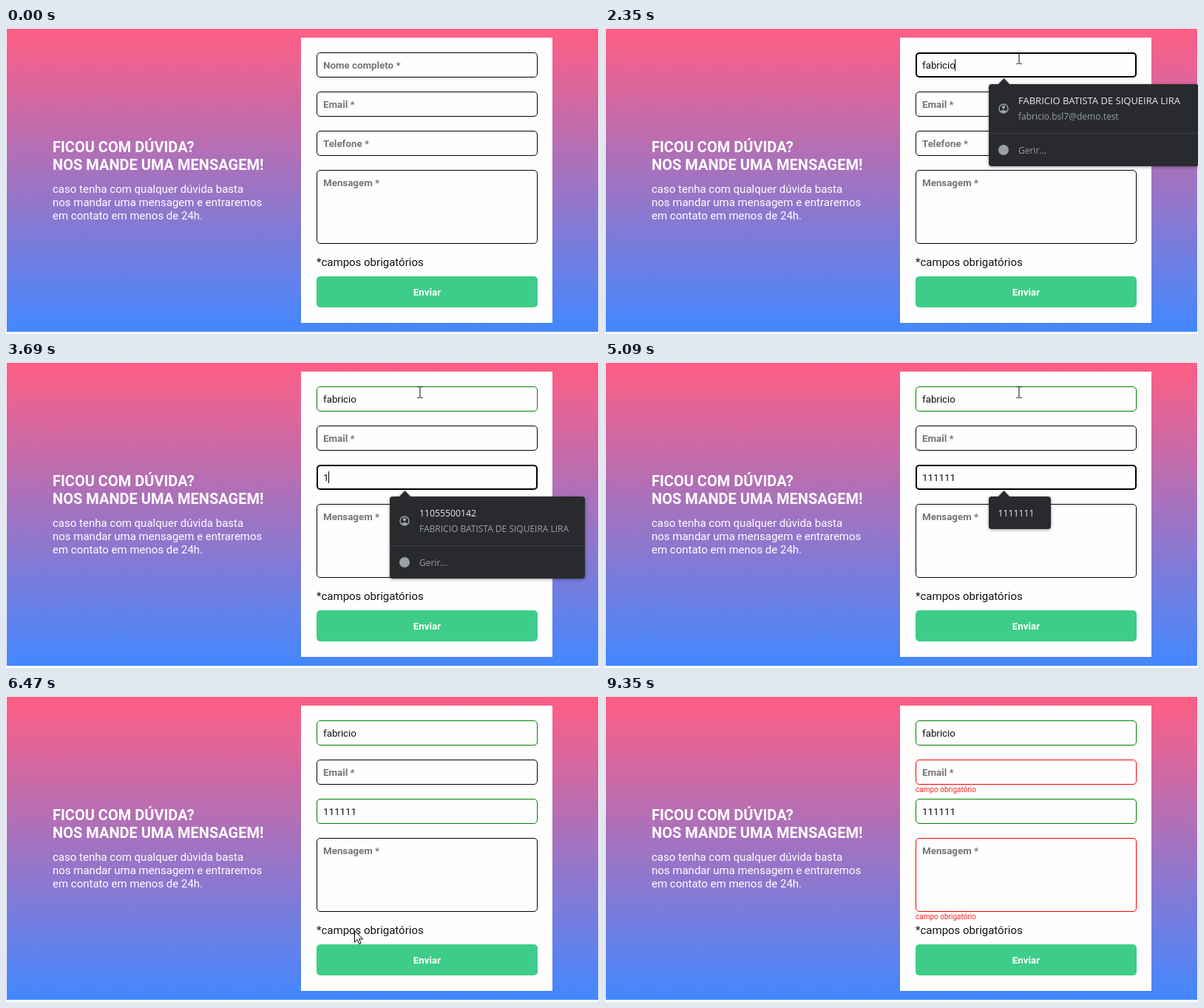
Recreate the animation shown at these times as an HTML page. Size 802 px wide and 414 px high, loop 9.55 s.

```html
<!DOCTYPE html>
<html lang="pt-BR">
<head>
<meta charset="utf-8">
<title>Formulário de contato</title>
<style>
  html, body { margin: 0; width: 100%; height: 100%; overflow: hidden; background: #fff; }
  svg { display: block; width: 802px; height: 414px; }
  text { font-family: Roboto, sans-serif; white-space: pre; }
  .title { font-weight: 700; font-size: 20px; fill: #fff; }
  .lead { font-size: 15px; fill: #fff; }
  .note { font-size: 15px; fill: #111; }
  .hint { font-weight: 700; font-size: 13.333px; fill: #757575; }
  .value { font-size: 13.333px; fill: #111; }
  .send { font-weight: 700; font-size: 13.333px; fill: #fff; text-anchor: middle; }
  .error { font-size: 10px; fill: #f22; }
  .popup { filter: drop-shadow(0 1px 2px rgba(0, 0, 0, .4)); }
  .popup text { font-family: "Open Sans", "Noto Sans", sans-serif; }
  .main { font-size: 13px; fill: #e8eaed; }
  .digits { font-size: 12.25px; fill: #e8eaed; }
  .sub { font-size: 12px; fill: #9aa0a6; }
  .pointer { fill: #fff; stroke: #000; stroke-linejoin: round; }
</style>
</head>
<body>
<svg id="stage" viewBox="0 0 802 414">
  <defs>
    <linearGradient id="sky" x1="0" y1="0" x2="0" y2="1">
      <stop offset="0" stop-color="#ff5e84"/>
      <stop offset="1" stop-color="#4288ff"/>
    </linearGradient>
  </defs>
  <rect x="1" y="1" width="800" height="410" fill="url(#sky)"/>
  <text class="title" x="63" y="168">FICOU COM DÚVIDA?</text>
  <text class="title" x="63" y="192">NOS MANDE UMA MENSAGEM!</text>
  <text class="lead" x="63" y="223">caso tenha com qualquer dúvida basta</text>
  <text class="lead" x="63" y="241">nos mandar uma mensagem e entraremos</text>
  <text class="lead" x="63" y="259">em contato em menos de 24h.</text>
  <rect x="399" y="13" width="340" height="386" fill="#fefefe"/>
  <g id="fields"></g>
  <rect id="caret" width="1" height="16" fill="#000"/>
  <g id="errors">
    <text class="error" x="420" y="130">campo obrigatório</text>
    <text class="error" x="420" y="302">campo obrigatório</text>
  </g>
  <text class="note" x="420" y="322">*campos obrigatórios</text>
  <rect x="420" y="336" width="299" height="42" rx="5" fill="#3dcd88"/>
  <text class="send" x="569.5" y="362">Enviar</text>
  <g id="popups"></g>
  <circle id="click" r="12" fill="#f8f020" opacity=".6"/>
  <g id="mouse">
    <path id="arrow" class="pointer" d="M.5 .5V16.2L4.2 12.7L6.7 18.4L9.1 17.4L6.6 11.8H11.6Z"/>
    <path id="beam" fill="none" stroke="#000" d="M-3.5 -7.5H-1L0 -6.5L1 -7.5H3.5M0 -6.5V6.5M-3.5 7.5H-1L0 6.5L1 7.5H3.5"/>
    <path id="hand" class="pointer" d="M-1.5 1.5Q0 -.8 1.5 1.5V8Q3.2 6.5 4.5 8.3Q6 7 7.3 9Q9.6 8.2 9.8 10.5V15Q9.5 18 8 19.5V21.5H-1.5V19.5L-5.5 13.5Q-6.5 11 -4 11.3L-1.5 13.5Z"/>
  </g>
</svg>
<script>
const LOOP = 9550, STEP = 70;
const $ = id => document.getElementById(id);

function add(parent, tag, attrs, text) {
  const el = document.createElementNS('http://www.w3.org/2000/svg', tag);
  for (const key in attrs) el.setAttribute(key, attrs[key]);
  if (text) el.textContent = text;
  parent.append(el);
  return el;
}
const show = (el, on) => { el.style.display = on ? '' : 'none'; };
const within = (t, from, to) => t >= from && t < to;

// Form fields
function makeField(y, height, label) {
  const g = $('fields');
  return {
    y, height,
    box: add(g, 'rect', { fill: 'none' }),
    hint: add(g, 'text', { class: 'hint', x: 429, y: y + 22 }, label),
    value: add(g, 'text', { class: 'value', x: 429, y: y + 22 })
  };
}
const fields = [
  makeField(33, 34, 'Nome completo *'),
  makeField(86, 34, 'Email *'),
  makeField(139, 34, 'Telefone *'),
  makeField(192, 100, 'Mensagem *')
];

function drawField(field, color, focused, value) {
  const line = focused ? 2 : 1;
  const attrs = {
    x: 420 + line / 2, y: field.y + line / 2,
    width: 299 - line, height: field.height - line,
    rx: 5 - line / 2, stroke: color, 'stroke-width': line
  };
  for (const key in attrs) field.box.setAttribute(key, attrs[key]);
  show(field.hint, !value);
  if (field.value.textContent !== value) field.value.textContent = value;
}

// Autofill popups
function makePopup(top, width, height) {
  const g = add($('popups'), 'g', { class: 'popup' });
  add(g, 'path', { d: `M531 ${top + 1}L539.5 ${top - 8}L548 ${top + 1}Z`, fill: '#292a2d' });
  add(g, 'rect', { x: 519, y: top, width, height, rx: 4, fill: '#292a2d' });
  g.style.transformOrigin = `${519 + width / 2}px ${top + height / 2}px`;
  return g;
}
function makeProfile(top, width, main, mainClass, sub) {
  const g = makePopup(top, width, 111);
  const gray = '#9aa0a6';
  add(g, 'circle', { cx: 539, cy: top + 33, r: 6, fill: 'none', stroke: gray, 'stroke-width': 1.5 });
  add(g, 'circle', { cx: 539, cy: top + 31, r: 2.2, fill: gray });
  add(g, 'path', { d: `M534.6 ${top + 37}Q539 ${top + 32.5} 543.4 ${top + 37}Q539 ${top + 41} 534.6 ${top + 37}Z`, fill: gray });
  add(g, 'text', { class: mainClass, x: 559, y: top + 27 }, main);
  add(g, 'text', { class: 'sub', x: 559, y: top + 48 }, sub);
  add(g, 'rect', { x: 519, y: top + 66, width, height: 1, fill: '#3f4246' });
  add(g, 'circle', { cx: 539, cy: top + 89, r: 7, fill: gray });
  add(g, 'text', { class: 'sub', x: 559, y: top + 94 }, 'Gerir...');
  return g;
}
const person = 'FABRICIO BATISTA DE SIQUEIRA LIRA';
const namePopup = makeProfile(76, 284, person, 'main', 'fabricio.bsl7@demo.test');
const phonePopup = makeProfile(182, 264, '11055500142', 'digits', person);
const shortPopup = makePopup(182, 84, 44);
add(shortPopup, 'text', { class: 'digits', x: 531.5, y: 209 }, '1111111');

function drawPopup(popup, t, from, fade, to) {
  show(popup, within(t, from, to));
  const gone = t < fade ? 0 : Math.floor((t - fade + 10) / STEP) * STEP / 320;
  popup.style.opacity = 1 - gone;
  popup.style.transform = `scale(${1 - gone * .053})`;
}

// Typing: one key per time
const nameKeys = [1480, 1610, 1880, 1970, 2070, 2160, 2250, 2350];
const phoneKeys = [3690, 3890, 4020, 4220, 4420, 4560];
const typed = (text, keys, t) => text.slice(0, keys.filter(k => k <= t).length);

// Pointer path: time, x, y
const path = [
  [200, 680, 2], [410, 645, 24], [620, 619, 46], [810, 619, 46], [950, 560, 41],
  [5290, 555, 52], [5430, 480, 125], [5640, 385, 215], [5780, 362, 236],
  [5980, 362, 236], [6190, 400, 265], [6470, 471, 317], [6750, 506, 348], [6890, 512, 353],
  [8090, 510, 349], [8370, 480, 270], [8720, 440, 120], [9000, 424, 42],
  [9070, 420, 34], [9350, 412, -24]
];
function pointerAt(t) {
  const i = path.findIndex(p => p[0] > t);
  if (i < 1) return path[i < 0 ? path.length - 1 : 0].slice(1);
  const [a, x, y] = path[i - 1], [b, u, v] = path[i];
  // Pointer rests through the long pauses
  if (b - a > 1000) return [x, y];
  const k = (t - a) / (b - a);
  return [x + (u - x) * k, y + (v - y) * k];
}
const legs = [200, 810, 5290, 5980, 8090];

function drawPointer(t) {
  const start = legs.filter(l => l <= t).pop() ?? 0;
  const [x, y] = pointerAt(start + Math.floor((t - start) / STEP) * STEP);
  const inside = x >= 420 && x < 719;
  const text = inside && fields.some(f => y >= f.y && y < f.y + f.height);
  const button = inside && y >= 336 && y < 378;
  show($('mouse'), within(t, 200, 9350));
  $('mouse').setAttribute('transform', `translate(${Math.round(x)} ${Math.round(y)})`);
  show($('beam'), text);
  show($('hand'), button);
  show($('arrow'), !text && !button);
  show($('click'), within(t, 670, 880) || within(t, 5980, 6120) || within(t, 7090, 7290));
  $('click').setAttribute('cx', x - (text ? 4 : 1));
  $('click').setAttribute('cy', y - 1);
}

function drawCaret(t, focus) {
  const blinkOff = within(t, 1280, 1480) || within(t, 5090, 5570);
  show($('caret'), focus >= 0 && !blinkOff);
  if (focus < 0) return;
  const { value, y } = fields[focus];
  const end = value.textContent ? value.getComputedTextLength() : 0;
  $('caret').setAttribute('x', Math.floor(429 + end));
  $('caret').setAttribute('y', y + 9);
}

function draw(t) {
  const focus = within(t, 740, 2950) ? 0 : within(t, 2950, 3220) ? 1 : within(t, 3220, 5980) ? 2 : -1;
  const failed = t >= 7290;
  const empty = failed ? '#f00' : '#000';
  drawField(fields[0], t >= 2950 ? '#008000' : '#000', focus === 0, typed('fabricio', nameKeys, t));
  drawField(fields[1], empty, focus === 1, '');
  drawField(fields[2], t >= 5980 ? '#008000' : '#000', focus === 2, typed('111111', phoneKeys, t));
  drawField(fields[3], empty, false, '');
  show($('errors'), failed);
  drawCaret(t, focus);
  drawPopup(namePopup, t, 740, 2950, 3220);
  drawPopup(phonePopup, t, 3690, 4020, 4020);
  drawPopup(shortPopup, t, 4020, 5500, 5780);
  drawPointer(t);
}

const begin = performance.now();
function tick() {
  draw((performance.now() - begin) % LOOP);
  requestAnimationFrame(tick);
}
tick();
</script>
</body>
</html>
```
